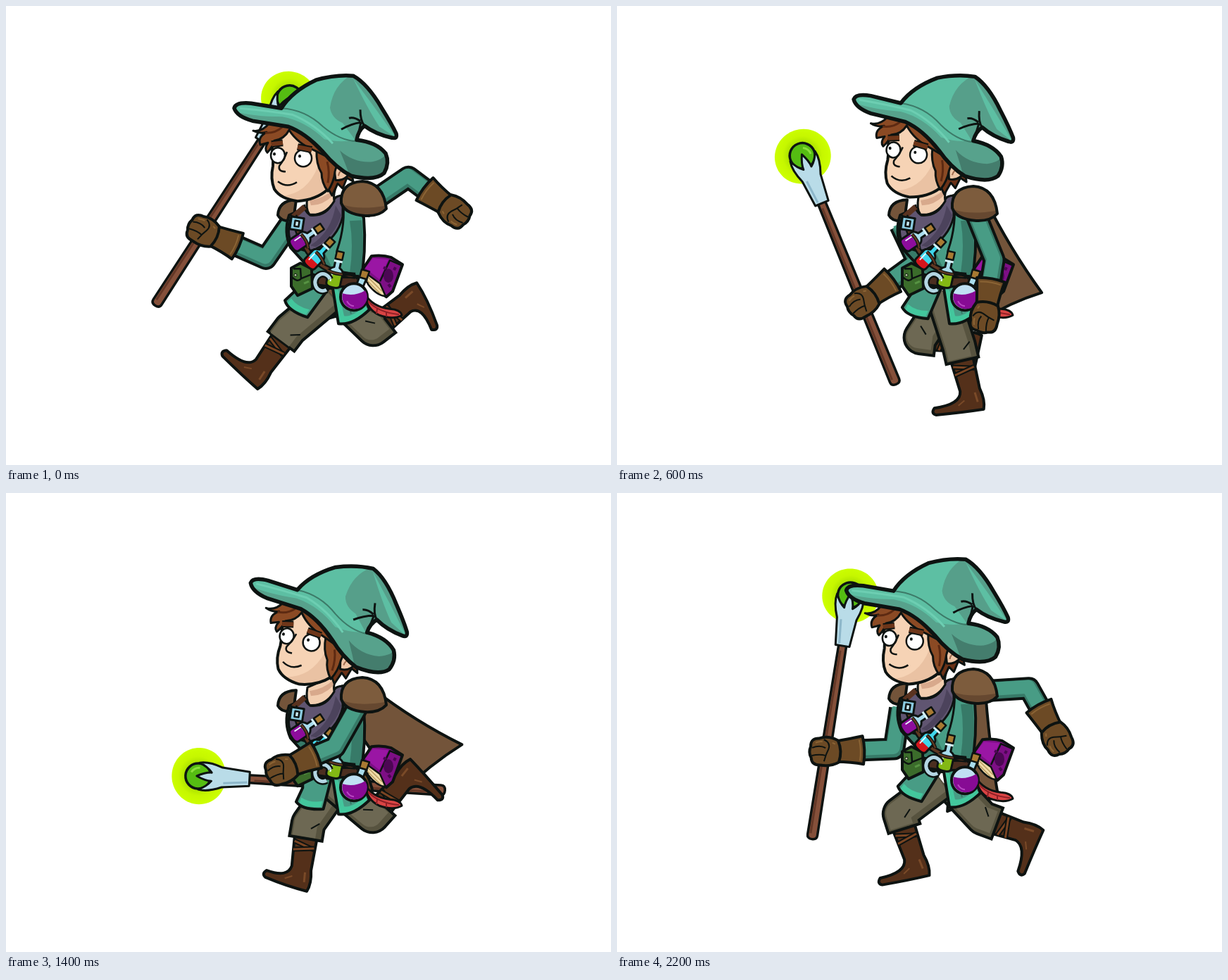
An HTML page with a canvas for the animation above (2400 ms loop, 859 by 652 pixels).

```html
<!DOCTYPE html>
<html lang="en">
<head>
<meta charset="utf-8">
<title>Running wizard</title>
<style>
html, body { margin: 0; width: 100%; height: 100%; overflow: hidden; background: #fff; }
canvas { display: block; }
</style>
</head>
<body>
<canvas id="stage" width="859" height="652"></canvas>
<script>
const ctx = document.getElementById('stage').getContext('2d');
const STEP = 200, COUNT = 12, RAD = Math.PI / 180;
const INK = '#0d1311', TEAL = '#489c85', TEAL_DARK = '#377a68', GLOVE = '#6c4a25', CAPE = '#73543a';

// Key points: step, then angles in degrees.
const STAFF_SWING = [[0, 176], [2, 150], [4, 82], [6, 20], [12, 176]];
const STRIDE = [[0, 50, 37], [2, 28, -15], [3, -18, -13], [5, -47, -72], [6, -50, -124],
  [7, -50, -138], [8, 18, -95], [10, 56, -72], [12, 50, 37]];

function track(t, keys) {
  const k = keys.findIndex(key => key[0] > t);
  const a = keys[k - 1], b = keys[k], p = (t - a[0]) / (b[0] - a[0]);
  return a.map((v, j) => v + (b[j] - v) * p);
}

const polar = ([x, y], r, deg) => [x + r * Math.cos(deg * RAD), y + r * Math.sin(deg * RAD)];

const cache = {};
const path = d => cache[d] || (cache[d] = new Path2D(d));
const poly = pts => new Path2D('M' + pts.map(p => p.join()).join('L'));

function line(d, color = INK, width = 2) {
  ctx.lineWidth = width;
  ctx.strokeStyle = color;
  ctx.stroke(typeof d === 'string' ? path(d) : d);
}

function shape(d, fill, width = 4) {
  const p = typeof d === 'string' ? path(d) : d;
  ctx.fillStyle = fill;
  ctx.fill(p);
  if (width) line(p, INK, width);
}

function oval(x, y, rx, ry, fill, width = 3) {
  const p = new Path2D();
  p.ellipse(x, y, rx, ry, 0, 0, 7);
  shape(p, fill, width);
}

function at(x, y, angle, draw) {
  ctx.save();
  ctx.translate(x, y);
  ctx.rotate(angle);
  draw();
  ctx.restore();
}

// Two-bone arm: the elbow follows from shoulder, hand and bone lengths.
function arm([sx, sy], [hx, hy], upper, lower) {
  const d = Math.hypot(hx - sx, hy - sy), ux = (hx - sx) / d, uy = (hy - sy) / d;
  const along = (upper * upper - lower * lower + d * d) / (2 * d);
  const out = Math.sqrt(Math.max(0, upper * upper - along * along));
  const ex = sx + ux * along + uy * out, ey = sy + uy * along - ux * out;
  const back = Math.atan2(ey - hy, ex - hx);
  const p = poly([[sx, sy], [ex, ey], polar([hx, hy], 40, back / RAD)]);
  line(p, INK, 32);
  line(p, TEAL_DARK, 24);
  ctx.save();
  ctx.translate(-1, -2);
  line(p, TEAL, 19);
  ctx.restore();
  at(hx, hy, back, glove);
}

function glove() {
  shape('M14,-14Q36,-17 53,-20Q57,0 53,20Q36,16 14,15Z', GLOVE);
  line('M48,-15Q51,0 48,15', '#8b6435', 2);
  shape('M18,-15Q4,-23 -8,-19Q-21,-20 -21,-8Q-25,0 -21,8Q-21,19 -8,19Q6,22 18,16Q24,0 18,-15Z', GLOVE);
  line('M-19,-6Q-8,-10 0,-5M-20,5Q-8,3 0,6M-2,-17Q8,-12 4,-3Q0,4 -3,14');
  line('M-14,-13Q-8,-15 -4,-14M10,-12L14,-10', '#8b6435', 2);
}

// depth narrows the stride of the leg further away.
function leg(t, depth) {
  const [, thigh, shin] = track(t, STRIDE);
  const hip = [462, 410];
  const knee = polar(hip, 76, 90 + thigh);
  const ankle = polar(knee, 80, 90 + shin);
  const toe = polar(ankle, 54, 176 + shin);
  drawLeg(...[hip, knee, ankle, toe].map(([x, y]) => [530 + (x - 530) * depth, y]));
}

function drawLeg(hip, knee, ankle, toe) {
  const len = Math.hypot(ankle[0] - knee[0], ankle[1] - knee[1]);
  const ux = (ankle[0] - knee[0]) / len, uy = (ankle[1] - knee[1]) / len;
  const from = ([x, y], a, b) => [x + ux * a - uy * b, y + uy * a + ux * b];

  const boot = new Path2D(
    `M${from(knee, 8, 17)}L${from(ankle, -16, 13)}Q${from(ankle, 2, 16)} ${from(toe, -5, 0)}` +
    `Q${from(toe, 1, 7)} ${from(toe, 5, 0)}Q${from(ankle, 14, 14)} ${from(ankle, 16, -14)}` +
    `Q${from(ankle, 4, -19)} ${from(ankle, -14, -15)}L${from(knee, 8, -16)}Z`);
  shape(boot, '#54301a');
  line(poly([from(ankle, -10, -7), from(ankle, 4, -8)]), '#7a4a28', 3);
  line(poly([from(ankle, -2, 10), from(ankle, 3, 20)]), '#7a4a28', 2);
  for (const [a, b] of [[28, 36], [40, 34]]) {
    const band = poly([from(knee, a, 15), from(knee, b, -14)]);
    line(band, INK, 7);
    line(band, '#7b4523', 3);
  }

  line(poly([hip, knee, from(knee, 24, 0)]), INK, 51);
  const cloth = poly([hip, knee, from(knee, 20, 0)]);
  line(cloth, '#57533f', 43);
  ctx.save();
  ctx.translate(-3, -1);
  line(cloth, '#6d6853', 33);
  ctx.restore();
  line(poly([from(knee, -2, -16), from(knee, 7, -5)]));
}

function drawCape(swing, drop) {
  const pin = [516, 285];
  const [px, py] = polar(pin, 150, 93 - 77 * swing);
  const [qx, qy] = polar(pin, 180 - 38 * swing, 114 - 50 * swing);
  const x = Math.min(522, px - 4), y = 266 + drop;
  const mx = (x + px) / 2 - 4, my = (y + py) / 2 + 6;
  shape(new Path2D(`M${x},${y}Q${mx},${my} ${px},${py}` +
    `Q${(px + qx) / 2 - 4},${(py + qy) / 2 - 5} ${qx},${qy}L480,310Z`), CAPE);
}

function drawStaff(x, y, deg) {
  at(x, y, deg * RAD, () => {
    ctx.translate(-225, 0);
    const glow = ctx.createRadialGradient(0, 0, 16, 0, 0, 40);
    glow.addColorStop(0, '#a6dd00');
    glow.addColorStop(.5, '#c6f700');
    glow.addColorStop(1, '#ccff00');
    ctx.beginPath();
    for (let k = 0; k < 72; k++) {
      const r = 39 + 1.5 * Math.sin(k * 12.7), a = k * Math.PI / 36;
      ctx.lineTo(r * Math.cos(a), r * Math.sin(a));
    }
    ctx.fillStyle = glow;
    ctx.fill();
    shape('M70,-5.5L345,-7Q351,-7 351,0Q351,7 345,7L70,5.5Z', '#85503a', 3.5);
    line('M80,2L343,3', '#643827', 3);
    oval(0, 0, 18, 18, '#55bd12', 3.5);
    line('M-10,-5Q-6,-12 2,-12', '#8be03c', 3);
    shape('M73,-10L34,-14Q14,-22 1,-19Q13,-14 19,-6Q10,-6 -2,0Q10,6 19,6Q13,14 1,19Q14,22 34,14L73,10Z', '#b9dce8', 3);
    line('M70,5L36,8', '#8db7ca', 3);
  });
}

function bottle(x, y, angle, glass, liquid, level) {
  at(x, y, angle, () => {
    const body = 'M-10,-6Q-10,-10 -4,-13V-25H4V-13Q10,-10 10,-6V11Q10,16 0,16Q-10,16 -10,11Z';
    shape(body, glass, 0);
    shape(`M-10,${level}H10V11Q10,16 0,16Q-10,16 -10,11Z`, liquid, 0);
    line(body, INK, 3);
    line('M-5,-5V8', '#e8faff', 2);
    shape('M-5,-36H5V-25H-5Z', '#a87a32', 2.5);
    line('M-6,-22H6', '#d6f3fa', 3);
  });
}

function drawBook() {
  shape('M507,374L519,356Q535,354 547,358L563,368L549,406L540,414L512,392Z', '#7d0f85');
  shape('M509,379L531,395L539,413Q526,412 514,396Z', '#f0dba8', 2.5);
  line('M514,386L534,406M513,391L531,409', '#b99a62', 1.5);
  shape('M510,373L521,359L543,361L530,389Z', '#9a16a4', 0);
  line('M531,392L545,362L561,369', INK, 2.5);
  oval(543, 384, 7, 10, '#4c0754', 0);
  line('M536,372L540,374M553,372L551,376M546,400L543,396', '#4c0754', 4);
}

function drawSkirt() {
  shape('M-20,-19Q-26,5 -32,19L-48,34Q-44,49 -16,58L14,17Z', TEAL);
  shape('M-44,37Q-40,47 -18,54L-13,47Q-31,43 -39,31Z', '#43c79d', 0);
}

function drawShirt() {
  const coat = 'M402,298Q394,322 404,344L424,366L428,398L464,402L472,452Q492,455 516,432L503,398Q512,350 508,302Q500,280 478,270L430,286Z';
  shape(coat, TEAL, 0);
  shape('M402,300Q396,324 406,343L425,364L438,380L464,375L452,350L410,338Z', TEAL_DARK, 0);
  shape('M488,306Q494,340 488,380L502,394Q510,348 505,305Z', TEAL_DARK, 0);
  shape('M464,404L473,450Q492,453 514,432L509,426Q493,443 480,441L472,404Z', '#43c79d', 0);
  line(coat, INK, 4);
  line('M478,274Q483,310 470,348L464,402', INK, 3);
  line('M484,418L490,438', TEAL_DARK, 2);

  shape('M405,300Q397,324 407,340Q424,353 440,346Q471,331 478,300V270Q466,270 464,280Q455,300 432,298Q423,292 424,284Z', '#605571', 3);
  shape('M476,298Q468,326 440,343L432,341Q462,322 468,284Z', '#4c435c', 0);
  shape('M428,272L470,254Q464,268 466,278Q453,299 431,297Q425,290 428,272Z', '#f2ceb0', 3);
  shape('M431,277Q452,274 466,260L464,270Q450,284 433,284Z', '#d8a98c', 0);
  line('M424,286L408,300', '#5a3320', 8);
}

function drawGear() {
  drawBook();
  const belt = 'M432,388Q466,396 502,391', strap = 'M409,298Q416,338 440,363Q462,382 496,384';
  line(belt, INK, 17);
  line(belt, '#4b2e20', 10);
  line(strap, INK, 9);
  line(strap, '#603821', 4);

  shape('M405,373L418,366L434,374L435,402L414,412L405,399Z', '#3b6c2b');
  line('M406,386Q414,394 419,388L418,374L408,374M419,388L434,382', INK, 2.5);
  line('M423,395L430,392', '#579343', 3);
  oval(411, 383, 2, 2, '#b9c9a0', 1);

  bottle(419, 334, .98, '#a9dcec', '#8d0d9c', -3);
  bottle(439, 359, .75, '#3fd6ea', '#d4161c', 4);
  bottle(467, 385, .22, '#a9dcec', '#83b814', -4);
  const loops = 'M419,325Q428,334 429,345M440,350Q448,357 452,368M456,376Q468,382 480,382';
  line(loops, INK, 5);
  line(loops, '#603821', 2.5);
  at(413, 310, .15, () => {
    shape('M-9,-9H9V9H-9Z', '#8acbe0', 3);
    shape('M-3,-4H3V4H-3Z', '#c4e6f0', 2.5);
  });
  const ring = 'M460,389A11,12 0 1 0 455,404';
  line(ring, INK, 10);
  line(ring, '#b4d6e3', 5);

  shape('M510,410Q520,428 545,431Q560,432 562,440Q550,447 530,440Q512,432 510,410Z', '#d94444', 3);
  line('M514,420Q528,436 558,439M527,431L526,438M540,435L540,442', '#8e2026', 2);

  line('M478,383Q492,379 500,388', INK, 5);
  shape('M497,398L502,385L512,388L506,402Z', '#a9dcec', 3);
  oval(494, 414, 19, 19, '#c0e0f3', 4);
  shape('M478,409Q494,414 510,405A17,17 0 0 1 494,431A17,17 0 0 1 478,409Z', '#870b94', 0);
  line('M484,420Q488,427 494,427', '#b947c3', 2);
  shape('M502,386L505,375L516,378L512,389Z', '#a87a32', 2.5);
}

function drawPad() {
  const pad = 'M476,280Q474,251 506,249Q536,251 540,288Q530,299 510,298Q482,296 476,280Z';
  shape(pad, '#7d5c3d', 0);
  shape('M478,282Q500,290 538,284L539,288Q530,299 510,298Q484,296 478,282Z', '#664830', 0);
  line(pad, INK, 4);
}

function drawFace() {
  shape('M452,205L488,225L493,250L484,245L478,260L471,253L463,270L455,256Z', '#6b3217', 3);
  shape('M466,232Q480,220 490,234Q483,250 468,248Z', '#efc7a8', 3);
  line('M472,242Q474,232 483,233', '#a16d50', 2);
  const face = 'M376,188Q380,214 379,228Q375,246 381,261Q390,275 414,278Q440,276 456,262L460,200L440,180L390,170Z';
  shape(face, '#f6d3b5', 0);
  shape('M456,260Q440,275 414,278Q398,276 390,271Q428,268 443,228L450,220Z', '#eac2a3', 0);
  line(face, INK, 4);
  shape('M404,170Q430,185 441,205Q440,225 448,238Q448,252 457,264Q466,250 467,236Q470,222 480,222L470,200L430,168Z', '#8b4a24', 3);
  shape('M351,178Q361,183 370,180Q357,187 361,198L372,195Q366,204 371,209Q379,201 381,192Q395,190 402,177Q414,196 438,206L456,215L440,180L400,165L374,167Q364,180 351,178Z', '#8b4a24', 3);
  line('M368,181Q382,182 392,173M415,180Q432,190 446,207M456,222Q460,236 457,252', '#5d2a12', 3);
  oval(386, 213, 10, 11, '#fff', 2.5);
  oval(422, 217, 12, 12, '#fff', 2.5);
  oval(381, 211, 2, 2.2, INK, 0);
  oval(417, 214, 2, 2.2, INK, 0);
  for (const brow of ['M377,197L393,195', 'M414,201L434,205']) {
    line(brow, INK, 10);
    line(brow, '#6e3619', 6);
  }
  line('M399,208Q395,219 388,228Q386,236 397,236M386,250Q399,260 413,251', INK, 2.5);
}

function drawHat() {
  const outline = 'M324,146Q326,137 348,139Q372,143 391,146Q406,122 440,106Q468,98 493,100Q513,111 533,145Q548,169 554,182Q556,190 548,188Q525,183 509,171Q500,178 498,191Q526,194 539,210Q545,224 537,238Q524,250 490,242Q469,231 450,208Q425,181 400,172Q376,168 350,164Q328,158 324,146Z';
  shape(outline, '#5dbfa3', 0);
  ctx.save();
  ctx.clip(path(outline));
  shape('M492,98Q465,112 460,145Q462,160 478,167L498,194L509,171L552,192L560,180L520,110Z', '#569f8a', 0);
  shape('M493,104Q524,145 554,188L530,172Q514,148 493,104Z', '#5dbfa3', 0);
  shape('M322,150Q350,158 392,158Q425,164 452,190Q478,196 498,190Q530,192 548,220L540,255L480,245L440,205L400,178L330,166Z', '#57a28c', 0);
  shape('M474,206Q494,224 520,222Q538,218 541,208L550,225L535,252L490,247Q482,225 474,206Z', '#447d6d', 0);
  line('M332,146Q376,150 406,155Q438,168 464,196', '#6dceb2', 3);
  ctx.restore();
  line('M391,146Q425,148 450,172Q474,192 498,193', '#3c7a68', 2);
  line('M509,171Q503,164 503,148M503,164Q494,158 487,160M504,166Q490,168 476,176M504,166L498,193', INK, 3);
  line(outline, INK, 5.5);
}

function draw(i) {
  const turn = i * 2 * Math.PI / COUNT;
  const swing = 1 - Math.abs(1 - i / 6);
  const lag = 1 - Math.cos(turn);
  const bob = 5.8 * Math.sin(2 * turn) - .8;

  const [, grip] = track(i, STAFF_SWING);
  const farShoulder = [402, 312 + bob];
  const farHand = polar(farShoulder, 122 + 32 * Math.max(0, Math.cos(grip * RAD)) ** 2, grip);
  const fist = 2 + 164 * swing, side = Math.cos(fist * RAD);
  const nearShoulder = [506, 288 + bob];
  const nearHand = polar(nearShoulder, 156 - 8 * side - 17 * side * side, fist);

  ctx.fillStyle = '#fff';
  ctx.fillRect(0, 0, 859, 652);
  drawCape(swing, 7 * lag);
  drawStaff(...farHand, .92 * grip - 39);
  arm(farShoulder, farHand, 58, 97);
  leg((i + 6) % COUNT, .87);
  leg(i, 1);
  at(0, bob, 0, () => {
    shape('M412,276Q387,277 386,298Q391,308 408,306Z', CAPE);
    at(444, 385, -26 * swing * RAD, drawSkirt);
    drawShirt();
    drawGear();
  });
  arm(nearShoulder, nearHand, 79, 82);
  at(0, 7 * lag, 0, drawPad);
  at(486, 290 + bob, 4.6 * lag * RAD, () => {
    ctx.translate(-486, -290);
    drawFace();
    drawHat();
  });
}

ctx.lineJoin = 'round';
const start = performance.now();
let shown = -1;
function tick() {
  const i = Math.floor((performance.now() - start) / STEP) % COUNT;
  if (i !== shown) draw(shown = i);
  requestAnimationFrame(tick);
}
tick();
</script>
</body>
</html>
```
